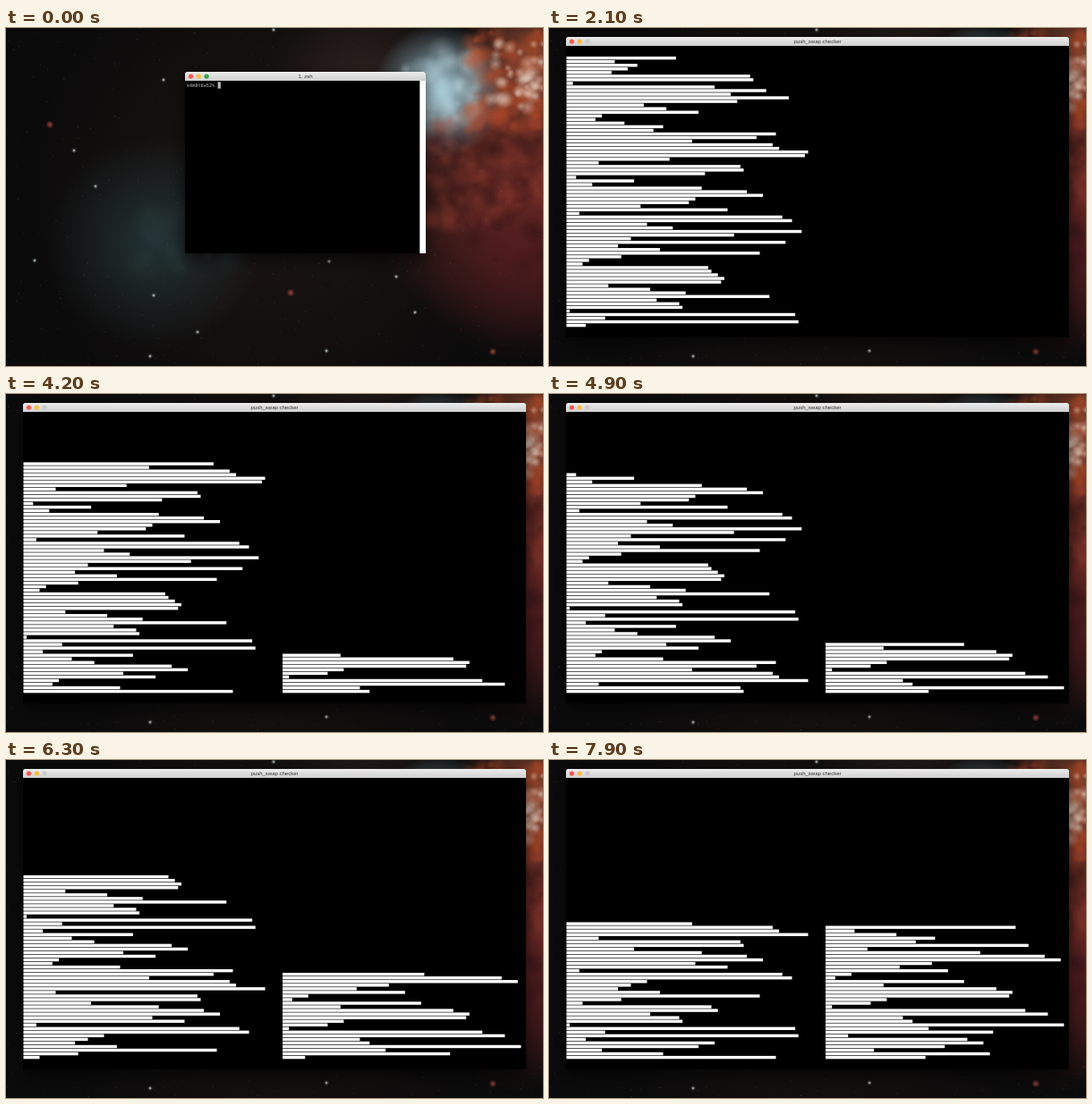
An HTML page with a canvas for the animation above (8 s loop, 600 px wide and 378 px high).

```html
<!DOCTYPE html>
<html lang="en">
<head>
<meta charset="utf-8">
<title>push_swap checker</title>
<style>
html, body { margin: 0; width: 100%; height: 100%; overflow: hidden; background: #0c0b0b; }
canvas { display: block; width: 600px; height: 378px; }
</style>
</head>
<body>
<canvas id="stage" width="600" height="378"></canvas>
<script>
const W = 600, H = 378, LOOP = 8000, TICK = 100;
const ctx = document.getElementById('stage').getContext('2d');

const START = [
  34, 15, 22, 19, 14, 57, 58, 2, 46, 62, 51, 69, 53, 24, 31, 41, 11, 9, 18, 30, 27, 65, 59, 39, 64,
  66, 75, 74, 32, 10, 54, 55, 43, 3, 21, 8, 42, 56, 61, 40, 38, 23, 50, 4, 67, 70, 25, 33, 73, 52,
  20, 68, 16, 29, 60, 17, 7, 5, 44, 45, 47, 49, 48, 13, 26, 37, 63, 28, 35, 36, 1, 71, 12, 72, 6];

// a: rotate stack A, p: push A's top to B, r: rotate stack B
const PHASES = [
  [2400, ''],
  [3500, 'aaapprppprapra'],
  [4200, 'prppraaaapapra'],
  [5600, 'aaaaaprpraaappapaaaappaaaa'],
  [7000, 'apppraapaaaapraapraaprppaprppaaa'],
  [7900, 'aaaappr' + 'paprpraapaap']
];
PHASES[4][1] = 'apppr' + 'apaaaa' + 'pra' + 'praa' + 'prppa' + 'prppaaa';

const PROMPT = 'k4m8t6w52% ';
const COMMAND = './push_swap $ARG | ./checker -v $ARG';

function stacksAt(t) {
  const a = START.slice(), b = [];
  for (let i = 1; i < PHASES.length; i++) {
    const [from] = PHASES[i - 1], [to, ops] = PHASES[i];
    const part = Math.max(0, Math.min(1, (t - from) / (to - from)));
    for (const op of ops.slice(0, Math.floor(part * ops.length + 1e-6))) {
      if (op === 'a') a.push(a.shift());
      else if (op === 'p') b.unshift(a.shift());
      else b.push(b.shift());
    }
  }
  return [a, b];
}

function disc(c, x, y, r, color) {
  c.fillStyle = color;
  c.beginPath();
  c.arc(x, y, r, 0, 7);
  c.fill();
}

function glow(c, x, y, r, rgb, alpha) {
  const g = c.createRadialGradient(x, y, 0, x, y, r);
  g.addColorStop(0, `rgba(${rgb},${alpha})`);
  g.addColorStop(0.5, `rgba(${rgb},${alpha * 0.5})`);
  g.addColorStop(1, `rgba(${rgb},0)`);
  c.fillStyle = g;
  c.fillRect(x - r, y - r, 2 * r, 2 * r);
}

function paintSky() {
  const sky = document.createElement('canvas');
  sky.width = W;
  sky.height = H;
  const c = sky.getContext('2d');
  let seed = 7;
  const rnd = () => (seed = seed * 16807 % 2147483647) / 2147483647;
  const patch = (n, x, y, w, h, size, rgb, alpha) => {
    while (n--) glow(c, x + rnd() * w, y + rnd() * h, size * (0.4 + rnd()), rgb, alpha);
  };

  c.fillStyle = '#0c0b0b';
  c.fillRect(0, 0, W, H);
  glow(c, 300, 190, 270, '50,36,32', 0.45);
  glow(c, 165, 240, 120, '44,72,76', 0.6);
  glow(c, 400, 60, 110, '62,46,42', 0.6);
  glow(c, 590, 170, 190, '130,50,42', 0.85);
  glow(c, 575, 250, 120, '90,26,34', 0.55);
  glow(c, 590, 40, 90, '165,85,58', 0.8);
  glow(c, 485, 70, 75, '160,205,220', 0.95);
  patch(60, 445, 25, 85, 85, 13, '190,220,228', 0.28);
  patch(90, 515, 5, 85, 110, 11, '185,74,38', 0.38);
  patch(45, 540, 15, 60, 75, 8, '235,215,200', 0.45);
  patch(90, 470, 100, 130, 120, 13, '150,62,46', 0.28);
  patch(40, 480, 120, 120, 150, 14, '40,16,18', 0.3);
  patch(30, 150, 200, 110, 70, 16, '52,76,76', 0.14);

  for (let i = 0; i < 900; i++) {
    c.fillStyle = `rgba(200,180,170,${0.04 + 0.22 * rnd() ** 3})`;
    c.fillRect(rnd() * W, rnd() * H, 1, 1);
  }
  const stars = [[76, 137], [176, 58], [100, 177], [165, 299], [361, 261], [436, 278],
    [161, 367], [358, 361], [299, 2], [32, 260], [457, 318], [214, 340]];
  for (const [x, y] of stars) {
    glow(c, x, y, 3, '190,215,215', 0.6);
    disc(c, x, y, 0.8, '#d5dddd');
  }
  for (const [x, y] of [[49, 108], [318, 296], [544, 362]]) glow(c, x, y, 4.5, '190,80,70', 0.8);
  return sky;
}

function drawWindow(x, y, w, h, title, lights) {
  ctx.save();
  ctx.shadowColor = 'rgba(0,0,0,0.65)';
  ctx.shadowBlur = 18;
  ctx.shadowOffsetY = 7;
  ctx.fillStyle = '#000';
  ctx.beginPath();
  ctx.roundRect(x, y, w, h, [2.5, 2.5, 1, 1]);
  ctx.fill();
  ctx.restore();

  const bar = ctx.createLinearGradient(0, y, 0, y + 10);
  bar.addColorStop(0, '#ececec');
  bar.addColorStop(1, '#cfcfcf');
  ctx.fillStyle = bar;
  ctx.beginPath();
  ctx.roundRect(x, y, w, 10, [2.5, 2.5, 0, 0]);
  ctx.fill();
  lights.forEach((color, i) => disc(ctx, x + 6.5 + i * 8.8, y + 5.1, 2.7, color));

  ctx.fillStyle = '#333';
  ctx.font = '6px "Liberation Sans", sans-serif';
  ctx.textAlign = 'center';
  ctx.fillText(title, x + w / 2, y + 7.2);
}

function drawTerminal(t) {
  drawWindow(200, 49, 269, 203, '1. zsh', ['#fc5753', '#fdbc40', '#33a848']);
  ctx.fillStyle = '#fff';
  ctx.fillRect(462.3, 59, 6.7, 193);
  const typed = COMMAND.slice(0, Math.floor(t / TICK * 2.1));
  const line = PROMPT + typed;
  ctx.font = '5.2px "DejaVu Sans Mono", monospace';
  ctx.textAlign = 'left';
  ctx.fillStyle = '#c4c4c4';
  ctx.fillText(line, 202, 66);
  ctx.fillStyle = '#bbb';
  ctx.fillRect(202.3 + ctx.measureText(line).width, 60.3, 3.2, 7.4);
}

function drawBars(stack, x) {
  ctx.fillStyle = '#fff';
  stack.forEach((v, i) => {
    const y = 332.6 - (stack.length - 1 - i) * 4.04;
    ctx.fillRect(x, y - 1.7, v * 3.6, 3.4);
  });
}

function drawChecker(t) {
  ctx.save();
  if (t < 2000) {
    ctx.globalAlpha = 0.8;
    ctx.translate(300, 178);
    ctx.scale(0.94, 0.94);
    ctx.translate(-300, -178);
  }
  drawWindow(19, 10, 562, 336, 'push_swap checker', ['#fc5753', '#fdbc40', '#cbcbcb']);
  if (t >= 2100) {
    const [a, b] = stacksAt(t);
    drawBars(a, 19.5);
    drawBars(b, 309);
  }
  ctx.restore();
}

const sky = paintSky();

function frame() {
  const t = Math.floor(performance.now() % LOOP / TICK) * TICK;
  ctx.drawImage(sky, 0, 0);
  if (t < 2000) drawTerminal(t);
  if (t >= 1900) drawChecker(t);
  requestAnimationFrame(frame);
}
frame();
</script>
</body>
</html>
```
